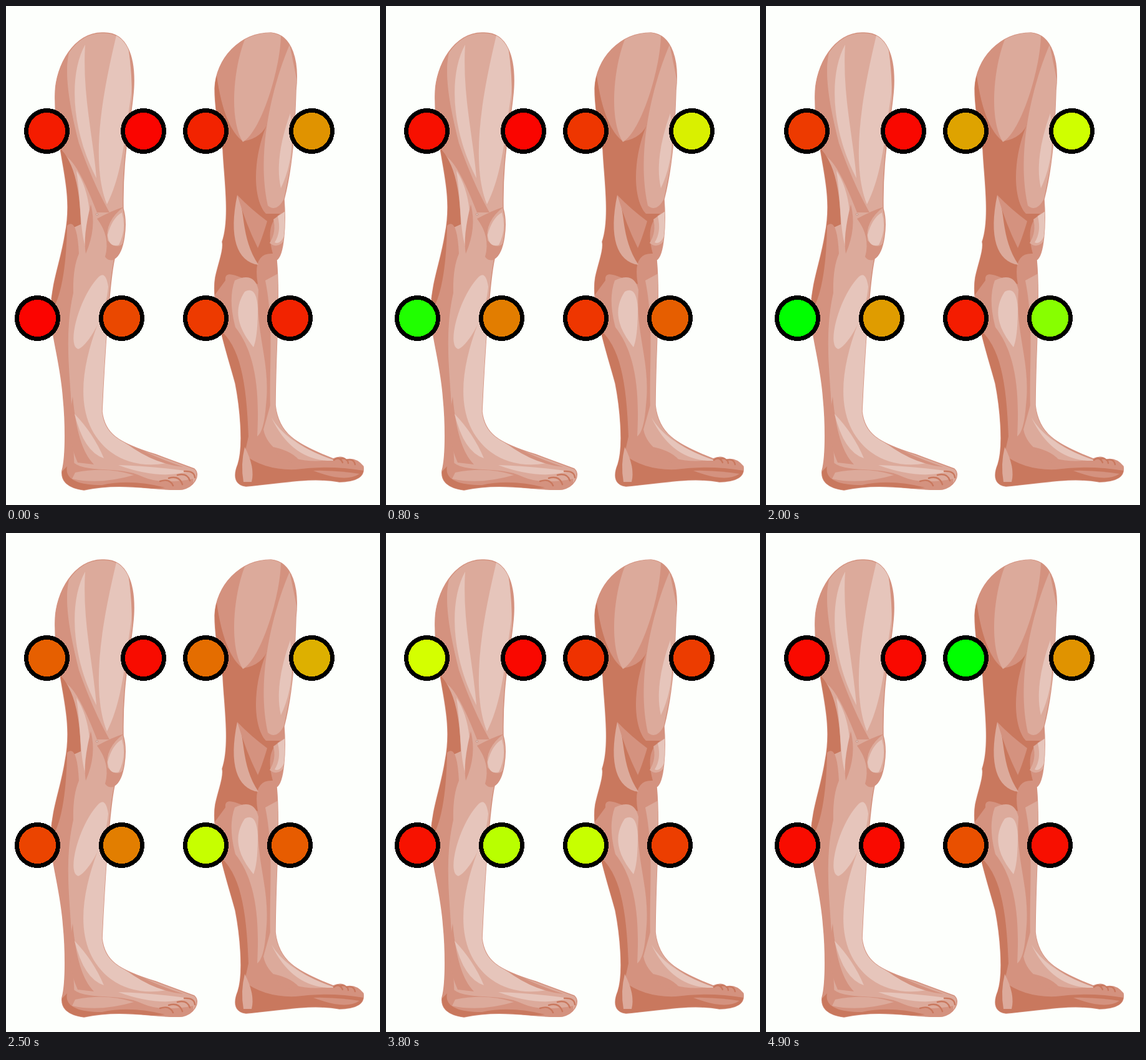
Write an HTML page that moves like this. It is 600 by 800 pixels and loops after 5000 ms.

```html
<!DOCTYPE html>
<html lang="en">
<head>
<meta charset="utf-8">
<title>Leg sensors</title>
<style>
html, body { margin: 0; width: 100%; height: 100%; overflow: hidden; background: #fdfffc; }
svg { display: block; width: 600px; height: 800px; }
.light { fill: #e6c5bb; }
.base { fill: #dcaa9b; }
.mid { fill: #d4927f; }
.dark { fill: #c9785e; }
.edge { stroke: #d4927f; stroke-width: 1.5; }
.crease { fill: none; stroke: #c9785e; stroke-width: 2.4; stroke-linecap: round; }
.sensor { stroke: #000; stroke-width: 7; shape-rendering: crispEdges; }
</style>
</head>
<body>
<svg id="stage" viewBox="0 0 600 800">
  <defs>
    <path id="left" d="M79 140C80 95 110 42 155 43C196 41 206 85 205 125C204 170 186 230 188 325C195 350 190 395 174 405C166 440 158 560 154 650C158 685 178 700 240 719L302 742C312 750 304 770 283 775C240 778 190 762 125 776C100 773 88 762 90 745C97 720 95 660 92 630C88 570 70 520 72 485C74 440 88 410 95 365C106 310 92 265 85 215Q78 170 79 140Z"/>
    <path id="right" d="M335 132C337 85 375 43 425 43C460 46 470 90 465 135C463 200 460 255 446 310C449 350 446 400 434 407C440 470 432 560 432 640C437 685 463 702 525 726Q538 720 546 727Q562 724 573 738C576 754 564 762 535 763C490 755 450 764 385 770C368 768 364 755 372 735C382 705 375 640 368 605C356 560 328 480 336 435C340 415 350 390 347 378C360 340 350 275 348 230Q335 170 335 132Z"/>
    <clipPath id="leftClip"><use href="#left"/></clipPath>
    <clipPath id="rightClip"><use href="#right"/></clipPath>
  </defs>

  <use href="#left" class="base edge"/>
  <g clip-path="url(#leftClip)">
    <path class="mid" d="M70 100L104 66C90 100 103 165 117 220Q140 285 166 331H146C130 290 112 250 95 240H70Z"/>
    <path class="light" d="M127 62C100 110 105 200 145 276C140 210 122 140 127 62Z"/>
    <path class="light" d="M177 47C165 100 130 240 162 318C186 270 190 215 201 140Q204 85 190 47Z"/>
    <path class="mid" d="M193 50Q202 90 203 165L212 140V70Z"/>
    <path class="dark" d="M80 222Q118 250 120 350L98 360C100 420 92 480 72 505H60Z"/>
    <path class="light" d="M113 264C135 295 141 355 129 391C118 360 121 320 113 264Z"/>
    <path class="mid" d="M136 318Q146 355 128 397Q123 370 136 318Z"/>
    <path class="mid" d="M146 341Q170 328 189 322Q158 345 163 376Q180 394 191 376V400Q166 414 159 402Q168 370 146 341Z"/>
    <path class="light" d="M163 367Q170 340 186 331Q194 358 181 383Q165 388 163 367Z"/>
    <path class="mid" d="M98 352Q114 338 117 397Q107 420 108 460C92 530 104 600 106 660L110 745H80V620L65 500Q96 470 98 352Z"/>
    <path class="light" d="M149 434Q160 424 164 450C160 500 130 545 116 550C96 545 118 465 149 434Z"/>
    <path class="light" d="M151 500L165 505L155 650Q165 690 215 715L258 733Q205 742 168 715C110 670 115 590 151 500Z"/>
    <path class="mid" d="M107 626C112 680 122 715 141 735L115 732Q95 690 107 626Z"/>
    <path class="light" d="M110 654Q140 685 157 725Q125 715 110 654Z"/>
    <path class="mid" d="M158 668Q195 710 285 739Q215 732 158 668Z"/>
    <path class="mid" d="M86 738L104 728C125 752 180 735 220 755Q250 768 300 758V785H80Z"/>
    <path class="base" d="M111 748Q160 738 205 752Q150 768 106 758Z"/>
    <path class="light" d="M180 736Q240 738 294 746Q245 760 180 736Z"/>
    <path class="dark" d="M86 750L98 738Q92 768 154 768Q200 758 255 772L120 785L88 770Z"/>
    <path class="crease" d="M247 762Q263 757 268 769M261 757Q278 752 283 767M275 752Q291 748 295 761M286 746Q302 745 303 756"/>
  </g>
  <circle cx="146" cy="334" r="1.6" class="light" stroke="#b98b7d" stroke-width=".7"/>

  <use href="#right" class="mid edge"/>
  <g clip-path="url(#rightClip)">
    <path class="dark" d="M325 110L338 112Q350 195 380 217Q412 212 421 184C394 245 396 310 417 333H440Q415 350 428 397Q395 395 404 446C375 435 350 420 352 440L330 470V300Z"/>
    <path class="base" d="M386 47C366 90 356 180 380 218C410 200 440 100 441 48Q415 35 386 47Z"/>
    <path class="base" d="M455 62C430 120 400 230 420 320Q434 332 446 309L475 160Z"/>
    <path class="light" d="M456 172Q466 240 441 292Q430 245 456 172Z"/>
    <path class="base" d="M371 303C385 325 375 370 405 415C370 410 357 370 371 303Z"/>
    <path class="mid" d="M371 303Q392 325 419 345Q410 375 404 388Q385 350 371 303Z"/>
    <path class="base" d="M429 342L450 328V370Q438 392 423 380Q434 362 429 342Z"/>
    <path class="light" d="M436 337L448 329V365Q440 384 431 379Q442 362 436 337Z"/>
    <path class="base" d="M367 440Q398 425 405 455C400 530 425 570 417 640Q414 682 403 690C408 600 395 550 368 515Q356 470 367 440Z"/>
    <path class="light" d="M383 458Q402 448 404 485Q404 530 397 547C375 520 362 490 383 458Z"/>
    <path class="dark" d="M342 518C375 545 386 600 389 690L378 740L355 780V600Z"/>
    <path class="base" d="M416 440L442 426L434 650H424C422 570 430 510 416 440Z"/>
    <path class="base" d="M424 640H434Q438 700 525 727C465 737 420 715 413 679Z"/>
    <path class="light" d="M426 660Q450 702 528 729Q460 732 426 660Z"/>
    <path class="dark" d="M360 742L380 718Q415 745 465 743Q520 735 580 746V775L355 782Z"/>
    <path class="mid" d="M429 707Q462 714 474 733Q440 735 429 707Z"/>
    <path class="base" d="M383 707Q400 740 394 763H381Q376 735 383 707Z"/>
    <path class="mid" d="M493 745Q530 744 567 750Q545 765 493 745Z"/>
    <path class="crease" d="M526 728Q535 721 540 732M535 726Q548 723 549 733M546 728Q558 725 560 735"/>
  </g>
</svg>
<script>
const stage = document.getElementById('stage');
const LOOP = 5000, STEP = 100, STRIDE = 1200;

// Muscle activity (0 red, 255 yellow, 469 green) at a few moments of the walk
const times = [0, 800, 1400, 2000, 3000, 3800, 4900];
const sensors = [
  { x: 65.5, y: 200.5, levels: [28, 16, 10, 58, 271, 257, 10] },
  { x: 220.5, y: 200.5, levels: [5, 5, 5, 8, 185, 8, 9] },
  { x: 320.5, y: 200.5, levels: [35, 54, 30, 163, 256, 50, 469] },
  { x: 490.5, y: 200.5, levels: [147, 240, 269, 262, 275, 60, 147] },
  { x: 50.5, y: 500.5, levels: [4, 437, 90, 469, 8, 18, 12] },
  { x: 185.5, y: 500.5, levels: [72, 125, 28, 156, 443, 284, 10] },
  { x: 320.5, y: 500.5, levels: [58, 54, 469, 28, 50, 270, 80] },
  { x: 455.5, y: 500.5, levels: [35, 94, 131, 334, 235, 62, 15] }
];

for (const s of sensors) {
  s.dot = document.createElementNS(stage.namespaceURI, 'circle');
  s.dot.setAttribute('class', 'sensor');
  s.dot.setAttribute('cx', s.x);
  s.dot.setAttribute('cy', s.y);
  s.dot.setAttribute('r', 33);
  stage.append(s.dot);
}

// Moments at a similar phase of the stride count most
function weight(t, key) {
  const gap = Math.abs(t - key) % STRIDE;
  const phase = Math.min(gap, STRIDE - gap);
  return 1 / (phase ** 2 + ((t - key) / 10) ** 2 + 1e-3);
}

function level(levels, weights) {
  let sum = 0, total = 0;
  weights.forEach((w, i) => { sum += w * levels[i]; total += w; });
  return sum / total;
}

function colour(v) {
  const r = v < 255 ? 210 + 42 * Math.exp(-v / 130) : 469 - v;
  return `rgb(${Math.round(r)},${Math.round(Math.min(v, 255))},0)`;
}

let start;
function draw(now) {
  start ??= now;
  const t = Math.floor((now - start) % LOOP / STEP) * STEP;
  const weights = times.map(key => weight(t, key));
  for (const s of sensors) s.dot.setAttribute('fill', colour(level(s.levels, weights)));
  requestAnimationFrame(draw);
}
requestAnimationFrame(draw);
</script>
</body>
</html>
```
